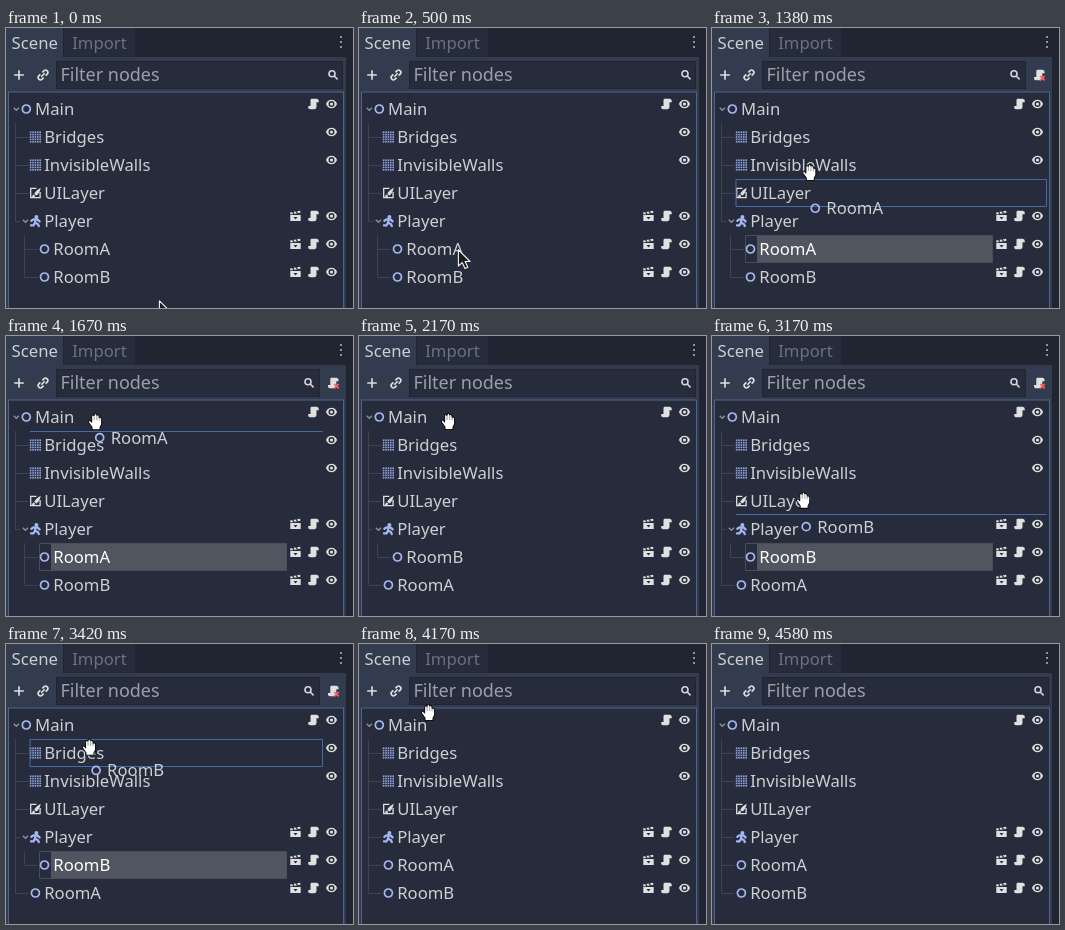
An HTML page that plays this animation: 347 px wide and 280 px high, repeating every 6.93 s.

```html
<!DOCTYPE html>
<html lang="en">
<head>
<meta charset="utf-8">
<title>Scene tree drag</title>
<style>
html, body { margin: 0; width: 100%; height: 100%; overflow: hidden; background: #202531; }
svg { display: block; width: 100vw; height: 100vh; }
text { font: 16.7px "Noto Sans", sans-serif; fill: #cdcfd2; white-space: pre; }
</style>
</head>
<body>
<svg viewBox="0 0 347 280">
  <defs>
    <g id="node2d"><circle r="4" fill="none" stroke="#a5b7f3" stroke-width="1.7"/></g>
    <g id="tilemap" fill="#93a5e0"></g>
    <g id="canvas">
      <path d="M1-4.7H-4.7V4.7H4.7V-1" fill="none" stroke="#e0e0e0" stroke-width="1.3"/>
      <path d="M5.3-5.3C2-3.5-.5-1-1.2.8L.8 2.6C3 1.5 4.8-2 5.3-5.3Z M-1.8 1.4C-3 1.6-2.6 3-3.8 3.7C-2 4.2-.2 4-.1 2.8Z" fill="#e0e0e0"/>
    </g>
    <g id="body" fill="none" stroke="#a5b7f3" stroke-width="2.3" stroke-linecap="round" stroke-linejoin="round">
      <circle cx="1" cy="-4" r="2" fill="#a5b7f3" stroke="none"/>
      <path d="M-4-.2L-2-1.6H2L4.2.4M.2-1.4L-.4 1.8L2.4 3L3.4 5M-.4 1.8L-2 4.4H-4.4"/>
    </g>
    <g id="eye">
      <path d="M-5.6 0C-3.4-5.6 3.4-5.6 5.6 0C3.4 5.6-3.4 5.6-5.6 0Z" fill="#e0e0e0"/>
      <circle r="3" fill="#262c3b"/><circle r="1.6" fill="#e0e0e0"/>
    </g>
    <g id="script">
      <path d="M-2.2-5.2H3.2Q5.3-5 5.3-3V-1.8H3V3Q3 5 1 5.2H-3.6Q-5.3 5-5.3 3.2V2H-3V-3.2Q-3-5-2.2-5.2Z" fill="#e0e0e0"/>
    </g>
    <g id="clip">
      <path d="M-5.2-1H5.2V5H-5.2ZM-5.4-3.5L4.6-5.2L5-3.2L-5-1.6Z" fill="#e0e0e0"/>
      <path d="M-3-4.4L-1.6-2M.6-5L2-2.6" stroke="#262c3b" stroke-width="1.2"/>
      <path d="M-2 1H2L0 3.6Z" fill="#262c3b"/>
    </g>
    <g id="search" fill="none" stroke="#d4d6da" stroke-width="1.6">
      <circle cx="-1" cy="-1.2" r="3"/><path d="M1.2 1L4.6 4.4"/>
    </g>
    <g id="arrow">
      <path d="M.4.8V17L4.2 13.6L7 19.6L9.8 18.3L7.1 12.5H12.1Z" fill="#1c1c1f" stroke="#f4f4f4" stroke-width="1.1" stroke-linejoin="round"/>
    </g>
    <g id="hand">
      <path d="M-3 8.5V6L-6.4 1.2Q-7.2-1-5-1L-3.4 .8V-5.4Q-2.4-7.4-1-5.6Q-.6-8.6 1.2-7.4L1.7-6Q3.4-7.4 4-5L4.2-3.6Q6.6-4.4 6.6-2V3L5 6.2V8.5Z" fill="#fff" stroke="#111" stroke-width="1.1" stroke-linejoin="round"/>
      <path d="M-.9-5V-1M1.7-5.4V-1M4.1-4V-.6" stroke="#777" stroke-width=".7"/>
    </g>
  </defs>

  <path d="M0 0H347V280H0Z" fill="#202531"/>
  <path d="M58 0H129V29H58Z" fill="#262c3b"/>
  <path d="M0 0H57V29H340V280H0Z" fill="#333b4f"/>
  <text x="5.6" y="21">Scene</text>
  <text x="66.2" y="21" style="fill:#6b717f">Import</text>
  <path d="M334 8h2v2h-2zM334 13h2v2h-2zM334 18h2v2h-2z" fill="#8f939d"/>
  <path d="M13 42.2V51.8M8.2 47H17.8" stroke="#e0e0e0" stroke-width="1.6"/>
  <g transform="translate(37 47) rotate(-45)" fill="none" stroke="#e0e0e0" stroke-width="1.6">
    <path d="M-1.4-2.3H-3.6A2.3 2.3 0 0 0-3.6 2.3H-1.4M1.4-2.3H3.6A2.3 2.3 0 0 1 3.6 2.3H1.4M-2.4 0H2.4"/>
  </g>
  <rect id="field" x="50.5" y="33.5" height="27" fill="#262c3b" stroke="#202531"/>
  <text x="54.4" y="53" style="font-size:18px;fill:#9b9fa8">Filter nodes</text>
  <use id="find" href="#search" y="47"/>
  <g id="detach" transform="translate(327.3 47)">
    <use href="#script"/>
    <path d="M1 1L5.4 5.4M5.4 1L1 5.4" stroke="#ff5f5f" stroke-width="1.7"/>
  </g>
  <rect x="2.5" y="64" width="335" height="230" fill="#262c3b" stroke="#4f6390"/>
  <g id="tree"></g>
  <path id="drop" fill="none" stroke="#466ca8"/>
  <g id="ghost"><use href="#node2d"/><text x="11" y="6"></text></g>
  <use id="cursor"/>
</svg>
<script>
const LOOP = 6930, ROW = 28, TOP = 67, LAG = 40;
const EDGE = [335, 317, 299, 282];
const $ = id => document.getElementById(id);

// name: icon, number of buttons on the right
const NODES = {
  Main: ["node2d", 2], Bridges: ["tilemap", 1], InvisibleWalls: ["tilemap", 1],
  UILayer: ["canvas", 0], Player: ["body", 3], RoomA: ["node2d", 3], RoomB: ["node2d", 3]
};
const BASE = [["Main", 0], ["Bridges", 1], ["InvisibleWalls", 1], ["UILayer", 1], ["Player", 1]];
const TREES = [
  [...BASE, ["RoomA", 2], ["RoomB", 2]],
  [...BASE, ["RoomB", 2], ["RoomA", 1]],
  [...BASE, ["RoomA", 1], ["RoomB", 1]]
];

const cubic = u => u < .5 ? 4 * u ** 3 : 1 - 4 * (1 - u) ** 3;
const out = u => 1 - (1 - u) ** 2;
const softOut = u => 1 - (1 - u) ** 1.5;
const rush = u => u ** 1.5;

// start, end, from, to, easing, sideways bow
const MOVES = [
  [40, 500, [153, 272], [99, 221], out, 0],
  [1000, 1730, [99, 220], [89, 85], cubic, 4],
  [2170, 2830, [89, 85], [79.7, 216], cubic, 0],
  [3000, 3680, [79.7, 216], [69, 68], softOut, 17],
  [4170, 4580, [69, 68], [150, 287], rush, 0]
];
const DRAGS = [
  { name: "RoomA", from: 1000, to: 2170, rootAt: 1710 },
  { name: "RoomB", from: 3000, to: 4170, rootAt: 3000 }
];

function pointer(t) {
  const [t0, t1, a, b, ease, bow] = MOVES.findLast(m => t >= m[0]) || MOVES[0];
  const e = ease(Math.min(1, Math.max(0, (t - t0) / (t1 - t0))));
  return [a[0] + (b[0] - a[0]) * e + bow * Math.sin(Math.PI * e), a[1] + (b[1] - a[1]) * e];
}

const rowY = i => TOP + ROW * i;
const left = depth => 14 + 9.5 * depth;
const use = (id, x, y) => `<use href="#${id}" x="${x}" y="${y}"/>`;
const line = d => `<path d="${d}" fill="none" stroke="#3e4452"/>`;
const chevron = (x, y) =>
  `<path d="M${x - 2.6} ${y - 1.3}l2.6 2.6l2.6-2.6" fill="none" stroke="#8b909c" stroke-width="1.4"/>`;
const selection = y =>
  `<path d="M45 ${y}H281V${y + ROW}H45Z" fill="#51555f"/>` +
  `<path d="M33.5 ${y + .5}H280.5V${y + ROW - .5}H33.5Z" fill="none" stroke="#484d58"/>`;

function treeMarkup(rows, picked) {
  return rows.map(([name, depth], i) => {
    const [icon, buttons] = NODES[name];
    const y = rowY(i) + 14, x = 20.3 + 9.1 * depth;
    const open = rows[i + 1] && rows[i + 1][1] > depth;
    let s = name === picked ? selection(rowY(i)) : "";
    if (depth) {
      const stem = depth === 1 ? 9.5 : 18.5;
      let p = i - 1;
      while (rows[p][1] >= depth) p--;
      s += line(`M${stem} ${rowY(p) + ROW}V${y + .5}H${open ? 14 : x - 7}`);
    }
    if (open) s += chevron(x - 10, y);
    s += use(icon, x, y);
    s += `<text x="${29.1 + 9.1 * depth}" y="${y + 6}"${name === picked ? ' style="fill:#fff"' : ""}>${name}</text>`;
    return s + ["eye", "script", "clip"].slice(0, buttons).map((b, k) => use(b, 325.5 - 18 * k, y - 5)).join("");
  }).join("");
}

function dropPath(rows, drag, y, t) {
  if (t < drag.rootAt) y = Math.max(y, rowY(1));
  const at = Math.max(0, (y - TOP) / ROW), i = Math.floor(at), part = at - i;
  if (!rows[i] || rows[i][0] === drag.name) return "";
  const [name, depth] = rows[i];
  const l = left(depth) + .5, r = EDGE[NODES[name][1]] - .5;
  const a = rowY(i) + .5, b = a + ROW - 1;
  if (i && part < .25) return `M${l} ${a}H${r}`;
  if (i && part > .75) return `M${l} ${b}H${r}`;
  return `M${l} ${a}H${r}V${b}H${l}Z`;
}

const show = (el, on) => el.setAttribute("visibility", on ? "visible" : "hidden");
const place = (el, x, y) => el.setAttribute("transform", `translate(${x.toFixed(2)} ${y.toFixed(2)})`);
let shown = "";

function render(t) {
  const stage = t < 2170 ? 0 : t < 4170 ? 1 : 2;
  const rows = TREES[stage];
  const drag = DRAGS.find(d => t >= d.from && t < d.to);
  const key = stage + (drag ? drag.name : "");
  if (key !== shown) {
    shown = key;
    $("tree").innerHTML = treeMarkup(rows, drag && drag.name);
    $("field").setAttribute("width", drag ? 263 : 286);
    $("find").setAttribute("x", drag ? 303 : 327);
    show($("detach"), drag);
  }

  const moving = drag && t >= drag.from + 80;
  const [x, y] = pointer(t), [gx, gy] = pointer(t - LAG);
  show($("ghost"), moving);
  $("drop").setAttribute("d", moving ? dropPath(rows, drag, gy, t) : "");
  if (moving) {
    $("ghost").lastChild.textContent = drag.name;
    place($("ghost"), gx + 4.5, gy + 15.3);
  }

  const released = DRAGS.some(d => t >= d.to && t < d.to + 40);
  $("cursor").setAttribute("href", moving || released ? "#hand" : "#arrow");
  place($("cursor"), x, y);
  show($("cursor"), t < 4580);
}

for (let i = 0; i < 25; i++)
  $("tilemap").innerHTML += `<rect x="${-5.6 + 2.4 * (i % 5)}" y="${-5.6 + 2.4 * Math.floor(i / 5)}" width="1.6" height="1.6"/>`;

const start = performance.now();
function tick() {
  render((performance.now() - start) % LOOP);
  requestAnimationFrame(tick);
}
tick();
</script>
</body>
</html>
```
